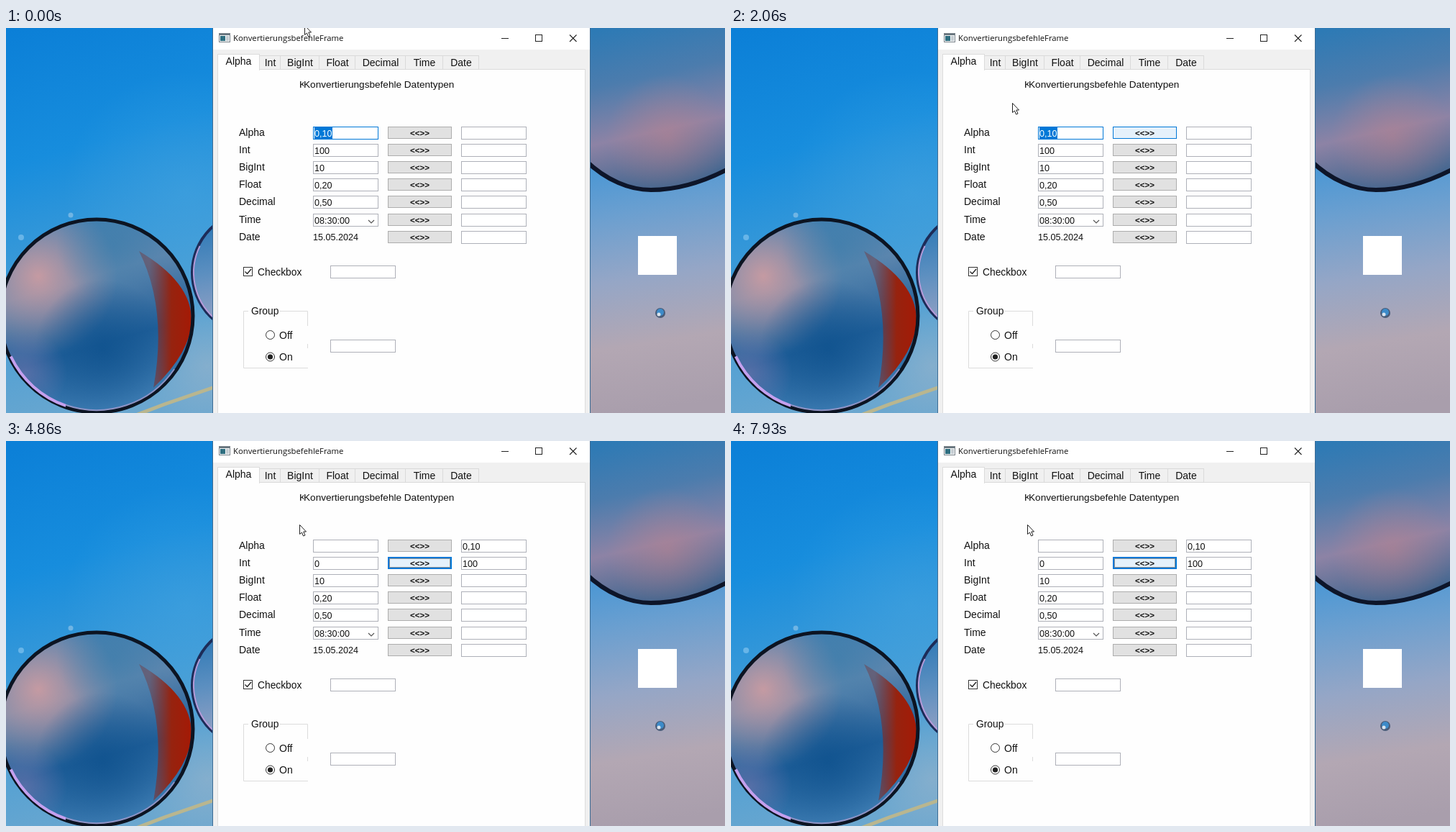
An HTML page with a canvas for the animation above (8000 ms loop, 1000 px wide and 535 px high).

```html
<!DOCTYPE html>
<html lang="de">
<head>
<meta charset="utf-8">
<title>Konvertierungsbefehle</title>
<style>
html, body { margin: 0; width: 100%; height: 100%; overflow: hidden; }
canvas { display: block; width: 1000px; height: 535px; }
</style>
</head>
<body>
<canvas id="stage" width="1000" height="535"></canvas>
<script>
const W = 1000, H = 535, LOOP = 8000, HOLD = 65;
const SANS = '"Liberation Sans", Arial, sans-serif';
const BLUE = '#0078d7';
const ROWS = ['Alpha', 'Int', 'BigInt', 'Float', 'Decimal', 'Time', 'Date'];
const VALUES = ['0,10', '100', '10', '0,20', '0,50', '08:30:00', '15.05.2024'];
const TABS = [294, 353, 382, 436, 486, 556, 608, 658];

// Press times of the first two buttons; each click swaps the row's value
const CLICKS = [[2930, 5200, 6400], [4460, 7300, 7860]];

// Pointer glides: start, end, x, y
const GLIDES = [
  [0, 1, 415, -4],
  [60, 460, 390, 30], [660, 1000, 662, 202], [1000, 1400, 554, 138],
  [1530, 2060, 391, 104], [2060, 2460, 406, 100], [2600, 2800, 412, 99],
  [3600, 3860, 402, 118], [4000, 4860, 408, 116], [4860, 5100, 418, 97],
  [6800, 6920, 412, 116]
];

let g;

function makeLayer(paint) {
  const layer = document.createElement('canvas');
  layer.width = W;
  layer.height = H;
  g = layer.getContext('2d');
  paint();
  return layer;
}

function fill(color, x, y, w, h) {
  g.fillStyle = color;
  g.fillRect(x, y, w, h);
}

function box(x, y, w, h, edge, inside) {
  if (inside) fill(inside, x, y, w, h);
  g.strokeStyle = edge;
  g.lineWidth = 1;
  g.strokeRect(x + .5, y + .5, w - 1, h - 1);
}

function text(str, x, y, size = 14, color = '#111', align = 'left', family = SANS, weight = 'normal') {
  g.font = `${weight} ${size}px ${family}`;
  g.textAlign = align;
  g.fillStyle = color;
  g.fillText(str, x, y);
}

function line(color, width, ...points) {
  g.strokeStyle = color;
  g.lineWidth = width;
  g.beginPath();
  points.forEach(([x, y]) => g.lineTo(x, y));
  g.stroke();
}

function disc(x, y, r, color) {
  g.beginPath();
  g.arc(x, y, r, 0, 2 * Math.PI);
  g.fillStyle = color;
  g.fill();
}

function ring(x, y, r, color, width, from = 0, to = 2 * Math.PI) {
  g.beginPath();
  g.arc(x, y, r, from, to);
  g.strokeStyle = color;
  g.lineWidth = width;
  g.stroke();
}

// Evenly spaced colour stops
function linear(x0, y0, x1, y1, ...colors) {
  const grad = g.createLinearGradient(x0, y0, x1, y1);
  colors.forEach((color, i) => grad.addColorStop(i / (colors.length - 1), color));
  return grad;
}

function glow(x, y, r, rgb, alpha) {
  const grad = g.createRadialGradient(x, y, 0, x, y, r);
  grad.addColorStop(0, `rgba(${rgb},${alpha})`);
  grad.addColorStop(1, `rgba(${rgb},0)`);
  fill(grad, x - r, y - r, 2 * r, 2 * r);
}

function paintWallpaper() {
  fill(linear(0, 0, 150, 535, '#0b7fd7', '#178ddd', '#459dd6', '#6ba7cf'), 0, 0, 300, H);
  glow(250, 230, 170, '70,165,225', .45);
  glow(280, 470, 90, '145,178,204', .7);

  // Bubble behind the window's left edge
  disc(345, 340, 86, linear(257, 260, 285, 425, '#2474b4', '#5c8fc0', '#a0a5c4'));
  ring(345, 340, 86, '#1d2c58', 4);
  ring(345, 340, 84, '#b59ad8', 2, 2.3, 3.6);
  line('#b9b68f', 5, [170, 542], [220, 523], [290, 499]);

  // Large bubble
  g.save();
  g.beginPath();
  g.arc(126, 400, 134, 0, 2 * Math.PI);
  g.clip();
  fill(linear(60, 265, 140, 535, '#3d7eb2', '#5d86ae', '#205f99', '#3f7eb4'), -10, 262, 275, 280);
  glow(45, 345, 110, '216,158,160', .85);
  glow(150, 300, 80, '60,125,170', .6);
  glow(135, 445, 95, '15,82,142', .85);
  glow(25, 480, 60, '120,120,175', .6);
  g.beginPath();
  g.moveTo(185, 310);
  g.quadraticCurveTo(320, 390, 205, 500);
  g.quadraticCurveTo(225, 390, 185, 310);
  g.fillStyle = linear(200, 400, 260, 400, 'rgba(120,45,45,.4)', '#96230f', '#a51905');
  g.fill();
  g.restore();
  ring(126, 400, 134, '#0c1422', 5);
  ring(126, 400, 132, '#c4a0ee', 4, 1.9, 2.7);
  ring(126, 400, 131, '#8e93c5', 2, .6, 1.9);
  disc(90, 260, 3.5, '#70b5e4');
  disc(21, 291, 4, '#68b5e8');

  // Right-hand side
  fill(linear(813, 170, 870, 535, '#3f94d6', '#6a9fd0', '#95a6c6', '#b3a7b3', '#a99eac'), 800, 0, 200, H);
  g.beginPath();
  g.moveTo(806, 184);
  g.bezierCurveTo(835, 212, 868, 225, 897, 225);
  g.bezierCurveTo(935, 225, 970, 214, 1006, 195);
  g.lineTo(1006, -5);
  g.lineTo(806, -5);
  g.closePath();
  g.fillStyle = linear(840, 0, 890, 225, '#2d7ab5', '#4c7cad', '#8d83a5', '#43668f');
  g.fill();
  g.save();
  g.clip();
  glow(920, 150, 85, '190,130,140', .5);
  g.restore();
  g.strokeStyle = '#0d1529';
  g.lineWidth = 6;
  g.stroke();

  fill('#fff', 879, 289, 54, 54);
  disc(910, 396, 7, '#4a5c78');
  disc(910, 395, 5, '#3d8bc9');
  disc(908, 398, 2.5, '#d9e4ee');
}

function paintForm() {
  fill('#3c6c95', 287, 0, 526, H);
  fill('#f0f0f0', 288, 0, 524, H);
  fill('#fff', 288, 0, 524, 30);

  // Title bar
  box(296, 7, 16, 13, '#7c858c', '#f4f6f7');
  fill('#66747d', 297, 8, 14, 2);
  fill('#2f6f80', 298, 11, 7, 7);
  fill('#c5cdd2', 306, 11, 4, 7);
  text('KonvertierungsbefehleFrame', 316, 18, 11.3, '#111', 'left', '"Open Sans", sans-serif');
  line('#222', 1, [689, 14.5], [699, 14.5]);
  box(736, 9, 10, 10, '#222');
  line('#222', 1.1, [784, 9.5], [793.5, 19]);
  line('#222', 1.1, [793.5, 9.5], [784, 19]);

  // Tabs and page
  box(294, 57, 512, 500, '#dcdcdc', '#fefefe');
  ROWS.forEach((name, i) => {
    const x = TABS[i], w = TABS[i + 1] - x;
    if (i) box(x - 1, 38, w + 1, 20, '#dadada', '#f0f0f0');
    else {
      box(x, 36, w, 23, '#dcdcdc', '#fefefe');
      fill('#fefefe', x + 1, 57, w - 2, 3);
    }
    text(name, x + w / 2, i ? 53 : 51, 14, '#111', 'center');
  });
  text('K', 408, 83, 13.6);
  fill('#fefefe', 414, 70, 6, 16);
  text('Konvertierungsbefehle Datentypen', 414, 83, 13.6);

  ROWS.forEach((name, i) => {
    const y = rowTop(i), boxed = name !== 'Date';
    text(name, 324, y + 13);
    if (boxed) field(427, y);
    field(633, y);
    paintButton(i);
    if (!CLICKS[i]) text(VALUES[i], boxed ? 429 : 427, y + (boxed ? 14 : 13), 12.6);
  });
  line('#555', 1.2, [504, 267], [508, 271], [512, 267]);

  // Checkbox
  box(330, 332, 13, 13, '#333', '#fff');
  line('#222', 1.4, [332.5, 338.5], [335.5, 341.5], [341, 335]);
  text('Checkbox', 350, 344, 13.8);
  field(451, 330);

  // Radio group
  line('#dcdcdc', 1, [419.5, 414], [419.5, 393.5], [330.5, 393.5], [330.5, 472.5], [420, 472.5]);
  line('#dcdcdc', 1, [419.5, 439], [419.5, 445]);
  fill('#fefefe', 337, 390, 44, 7);
  text('Group', 341, 398, 13.8);
  ['Off', 'On'].forEach((name, i) => {
    const y = 426.5 + 30.5 * i;
    ring(367.5, y, 6, '#333', 1);
    text(name, 380, y + 5);
  });
  disc(367.5, 457, 3.6, '#222');
  field(451, 433);
}

function rowTop(i) {
  return Math.round(136.5 + i * 24.2);
}

function field(x, y, edge = '#aeb0b8') {
  box(x, y, 91, 18, edge, '#fff');
}

function paintButton(i, hover, focus, down) {
  const y = rowTop(i);
  const face = down ? '#cce4f7' : hover ? '#e5f1fb' : '#e1e1e1';
  const edge = down ? '#005499' : hover || focus ? BLUE : '#adadad';
  box(531, y, 89, 17, edge, face);
  if (focus) {
    box(532, y + 1, 87, 15, edge);
    g.setLineDash([1, 1]);
    box(533, y + 2, 85, 13, '#333');
    g.setLineDash([]);
  }
  text('<<>>', 575.5, y + 13, 11.6, '#111', 'center', SANS, 'bold');
}

function paintRow(i, t, hover, focus) {
  const y = rowTop(i);
  const moved = CLICKS[i].filter(press => t >= press + HOLD).length % 2;
  const down = CLICKS[i].some(press => t >= press && t < press + HOLD);
  const editing = i === 0 && focus < 0;
  field(427, y, editing ? BLUE : undefined);
  if (editing) fill(BLUE, 429, y + 1, 25, 16);
  const rest = i ? '0' : '';
  text(moved ? rest : VALUES[i], 429, y + 14, 12.6, editing ? '#fff' : '#111');
  if (moved) text(VALUES[i], 635, y + 14, 12.6);
  paintButton(i, hover === i, focus === i, down);
}

function pointerAt(t) {
  let x = 0, y = 0;
  for (const [from, to, x1, y1] of GLIDES) {
    const u = Math.min(1, Math.max(0, (t - from) / (to - from)));
    const s = from ? u * u * (3 - 2 * u) : 1;
    x += (x1 - x) * s;
    y += (y1 - y) * s;
  }
  return [x, y];
}

// The pointer is drawn up and left of the spot it acts on
function hoveredRow(x, y) {
  if (x > 430 || y < 90) return -1;
  return y < 109 ? 0 : 1;
}

function focusedRow(t) {
  const last = CLICKS.map(presses => Math.max(0, ...presses.filter(press => t >= press)));
  if (!last[0] && !last[1]) return -1;
  return last[0] > last[1] ? 0 : 1;
}

function paintPointer(x, y, sizing) {
  const arrow = [[0, 0], [0, 13], [3, 10.5], [5, 15.5], [7.5, 14.5], [5.3, 9.5], [9, 9.5]];
  const half = [[-9, 0], [-5, -4], [-5, -1.5], [5, -1.5], [5, -4]];
  const outline = sizing ? [...half, ...half.map(([a, b]) => [-a, -b])] : arrow;
  g.beginPath();
  outline.forEach(([dx, dy]) => g.lineTo(Math.round(x) + dx + .5, Math.round(y) + dy + .5));
  g.closePath();
  g.fillStyle = '#fff';
  g.fill();
  g.strokeStyle = '#222';
  g.lineWidth = 1;
  g.stroke();
}

const wallpaper = makeLayer(paintWallpaper);
const form = makeLayer(paintForm);
const stage = document.getElementById('stage').getContext('2d');

function frame(now) {
  const t = Math.max(0, now) % LOOP;
  const [x, y] = pointerAt(t);
  const hover = hoveredRow(x, y), focus = focusedRow(t);
  g = stage;
  g.drawImage(wallpaper, 0, 0);
  g.drawImage(form, 0, 0);
  CLICKS.forEach((presses, i) => paintRow(i, t, hover, focus));
  paintPointer(x, y, Math.abs(x - 608) < 20 && t > 1000);
  requestAnimationFrame(frame);
}
requestAnimationFrame(frame);
</script>
</body>
</html>
```
